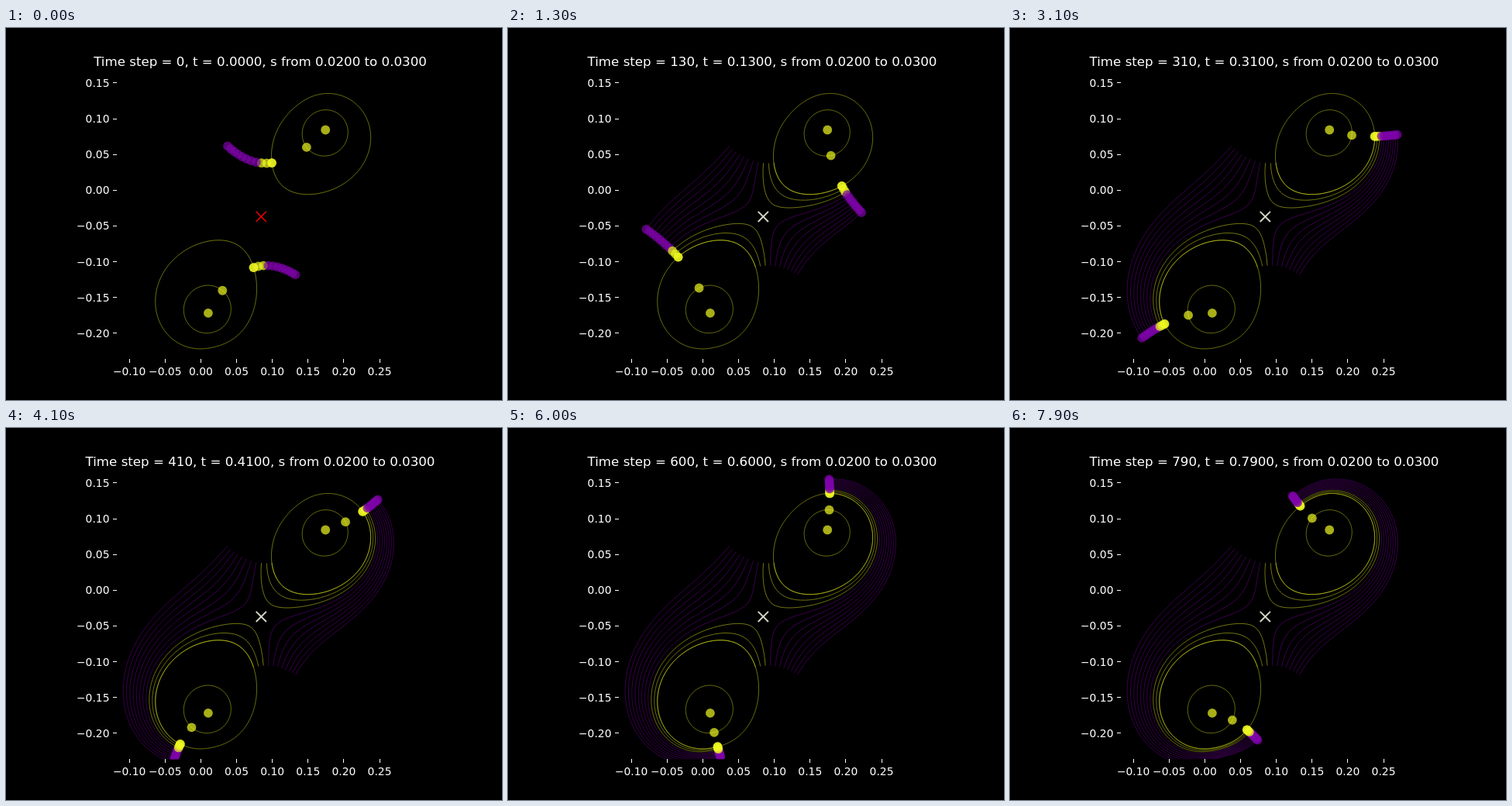
An HTML page with a canvas that plays this animation: 640 px wide and 480 px high, repeating every 8000 ms.

```html
<!DOCTYPE html>
<html lang="en">
<head>
<meta charset="utf-8">
<title>Root paths around a branch point</title>
<style>
html, body { margin: 0; width: 100%; height: 100%; overflow: hidden; background: #000; }
canvas { display: block; width: 640px; height: 480px; }
</style>
</head>
<body>
<canvas id="stage" width="640" height="480"></canvas>
<script>
const ctx = document.getElementById('stage').getContext('2d');
const LOOP = 8000, FRAME = 100;
const STEPS = 1000;                       // time steps in one full turn of the parameter
const FONT = '"DejaVu Sans", sans-serif';
const YELLOW = 'rgba(240,249,33,0.7)', PURPLE = 'rgba(126,3,168,0.7)';
const BOX = { x: 143.2, y: 57.6, size: 369.6 };
const ORIGIN = { x: 251.4, y: 209.3 }, TICK = 46.13;
const SADDLE = { x: 329.3, y: 243.4 };

// The two roots are mean(w) ± sqrt(square(w)) with w = (s / 0.02) e^(2πit).
// Complex coefficients by rising power of w, in pixels from the saddle.
const MEAN = [[7.25, -6.3], [-6.7, 5.3], [1.4, 2.85]];
const SQUARE = [[-8248, 17884], [6630, -14960], [-2475, -1619], [-325, 280]];

const add = (a, b) => [a[0] + b[0], a[1] + b[1]];
const mul = (a, b) => [a[0] * b[0] - a[1] * b[1], a[0] * b[1] + a[1] * b[0]];
const polar = (r, a) => [r * Math.cos(a), r * Math.sin(a)];
const poly = (c, w) => c.reduceRight((sum, k) => add(mul(sum, w), k), [0, 0]);

function sqrt([x, y]) {
  return polar(Math.sqrt(Math.hypot(x, y)), Math.atan2(y, x) / 2);
}

// Follows one root through a full turn, staying on its branch
function rootPath(s, side) {
  const points = [];
  let last = [0, side];
  for (let i = 0; i <= STEPS; i++) {
    const w = polar(s / .02, 2 * Math.PI * i / STEPS);
    let d = sqrt(poly(SQUARE, w));
    if (d[0] * last[0] + d[1] * last[1] < 0) d = [-d[0], -d[1]];
    last = d;
    const z = add(poly(MEAN, w), d);
    points.push([SADDLE.x + z[0], SADDLE.y - z[1]]);
  }
  return points;
}

const lobes = [1, -1].map(side => ({
  center: rootPath(0, side)[0],
  orbits: [.01, .02].map(s => rootPath(s, side)),
  paths: Array.from({ length: 11 }, (_, i) => rootPath(.02 + i * .001, side))
}));

// Paths below the branch point close on themselves, the others swap lobes
const color = i => i < 3 ? YELLOW : PURPLE;

function trace(points, end, stroke) {
  ctx.beginPath();
  for (let i = 0; i <= end; i++) ctx.lineTo(...points[i]);
  ctx.strokeStyle = stroke;
  ctx.stroke();
}

function dot([x, y], fill) {
  ctx.beginPath();
  ctx.arc(x, y, 5.9, 0, 2 * Math.PI);
  ctx.fillStyle = fill;
  ctx.fill();
}

function cross({ x, y }, stroke, width) {
  const r = 6.6;
  ctx.beginPath();
  ctx.moveTo(x - r, y - r);
  ctx.lineTo(x + r, y + r);
  ctx.moveTo(x - r, y + r);
  ctx.lineTo(x + r, y - r);
  ctx.strokeStyle = stroke;
  ctx.lineWidth = width;
  ctx.stroke();
}

const label = k => (k < 0 ? '\u2212' : '') + Math.abs(k * .05).toFixed(2);

function drawAxes() {
  ctx.fillStyle = '#fff';
  ctx.font = '13.89px ' + FONT;
  ctx.textAlign = 'center';
  for (let k = -2; k <= 5; k++) {
    const x = ORIGIN.x + k * TICK;
    ctx.fillRect(Math.round(x - .5), 427, 1, 5);
    ctx.fillText(label(k), x, 448);
  }
  ctx.textAlign = 'right';
  for (let k = -4; k <= 3; k++) {
    const y = ORIGIN.y - k * TICK;
    ctx.fillRect(138, Math.round(y - .5), 5, 1);
    ctx.fillText(label(k), BOX.x - 9.7, Math.round(y + 5));
  }
}

function draw(step) {
  ctx.fillStyle = '#000';
  ctx.fillRect(0, 0, 640, 480);
  drawAxes();
  ctx.font = '16.67px ' + FONT;
  ctx.textAlign = 'center';
  ctx.fillText(`Time step = ${step}, t = ${(step / STEPS).toFixed(4)}, s from 0.0200 to 0.0300`, 328, 49);

  ctx.save();
  ctx.beginPath();
  ctx.rect(BOX.x, BOX.y, BOX.size, BOX.size);
  ctx.clip();
  ctx.lineWidth = .69;
  for (const { orbits, paths } of lobes) {
    orbits.forEach(p => trace(p, STEPS, YELLOW));
    paths.forEach((p, i) => trace(p, step, color(i)));
  }
  for (const { center, orbits, paths } of lobes) {
    dot(center, YELLOW);
    orbits.forEach(p => dot(p[step], YELLOW));
    paths.forEach((p, i) => dot(p[step], color(i)));
  }
  if (step === 0) cross(SADDLE, '#f00', 1.4);
  else cross(SADDLE, '#d8d8c8', 1.9);
  ctx.restore();
}

let shown = -1;
function tick() {
  const step = Math.floor(performance.now() % LOOP / FRAME) * 10;
  if (step !== shown) draw(shown = step);
  requestAnimationFrame(tick);
}
tick();
</script>
</body>
</html>
```
